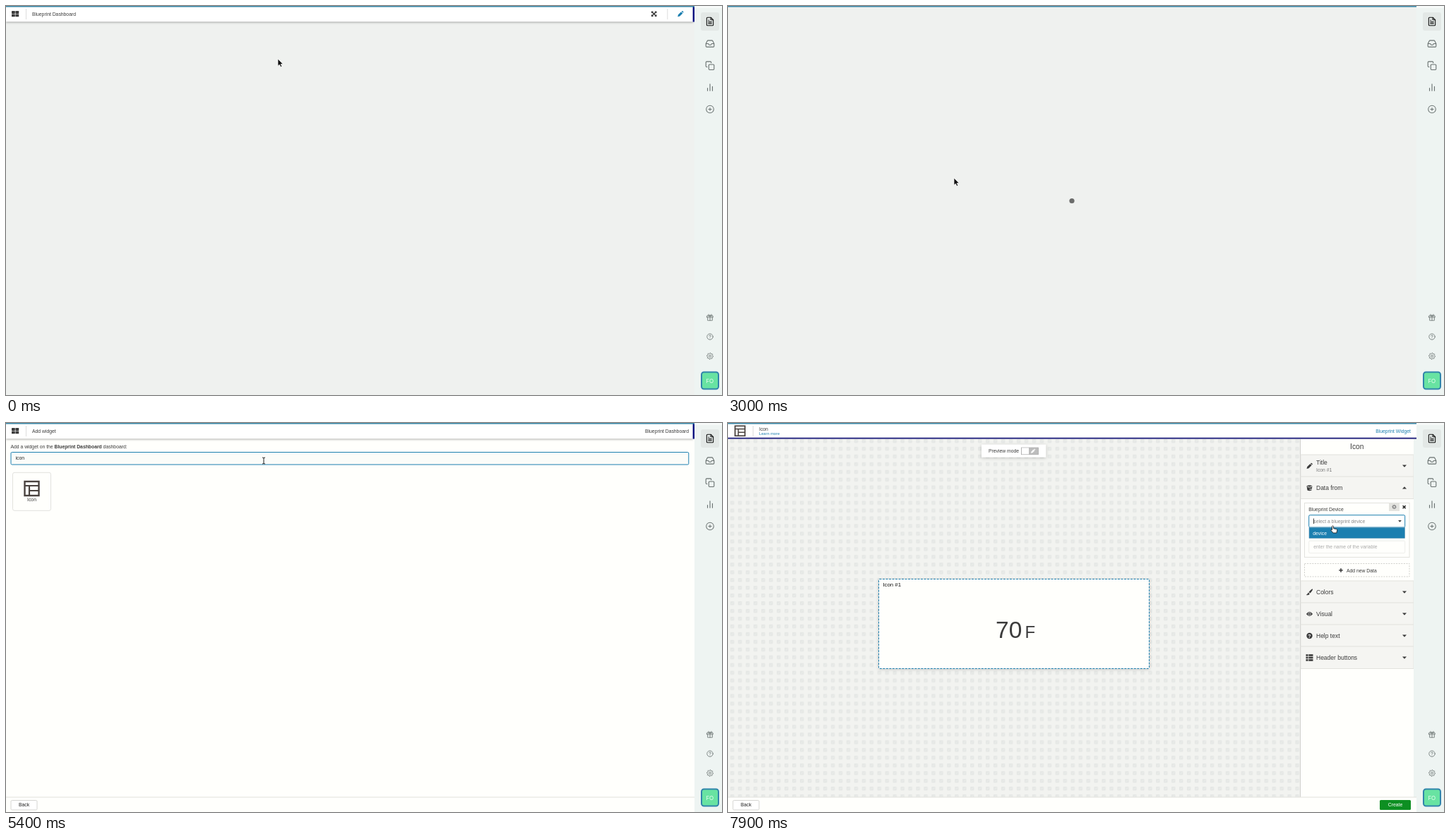
Animation of 1014 by 552 pixels, one loop 8000 ms. Source, as an HTML page:

```html
<!DOCTYPE html>
<html lang="en">
<head>
<meta charset="utf-8">
<title>Dashboard widget</title>
<style>
html, body { margin: 0; width: 100%; height: 100%; overflow: hidden; background: #eff1ef; }
svg { display: block; }
text { font-family: "Liberation Sans", Arial, sans-serif; white-space: pre; }
.bar { filter: drop-shadow(0 1px 1.5px #0005); }
.pill { filter: drop-shadow(0 1px 2px #0003); }
</style>
</head>
<body>
<svg width="1014" height="552" viewBox="0 0 1014 552">
  <defs>
    <pattern id="dots" x="3.3" y=".9" width="10.96" height="10.96" patternUnits="userSpaceOnUse">
      <rect width="5.5" height="5.5" rx="1" fill="#e5e7e5"/>
      <path d="M1.5 4 4 1.5" stroke="#eff1ef" stroke-width=".8"/>
    </pattern>
    <linearGradient id="edit"><stop offset=".5" stop-color="#fff"/><stop offset="1" stop-color="#d6d6d6"/></linearGradient>
    <linearGradient id="fade" x2="0" y2="1"><stop stop-color="#4a4340"/><stop offset=".5" stop-color="#1c7fb0"/><stop offset="1" stop-color="#1c7fb0" stop-opacity=".2"/></linearGradient>
  </defs>
  <g id="stage"></g>
</svg>
<script>
const LOOP = 8000, STEP = 100;
const BLUE = '#1c7fb0', DARK = '#4a4340', INK = '#3c3c3c', PAGE = '#fffffc', LINE = '#e2e2de';

// drawing helpers
const fill = (d, c = DARK) => `<path d="${d}" fill="${c}"/>`;
const stroke = (d, c = DARK, w = 2, more = '') => `<path d="${d}" fill="none" stroke="${c}" stroke-width="${w}" ${more}/>`;
const rect = (x, y, w, h, c, more = '') => `<rect x="${x}" y="${y}" width="${w}" height="${h}" fill="${c}" ${more}/>`;
const circle = (x, y, r, c, more = '') => `<circle cx="${x}" cy="${y}" r="${r}" fill="${c}" ${more}/>`;
const text = (x, y, s, size = 6.8, c = INK, more = '') => `<text x="${x}" y="${y}" font-size="${size}" fill="${c}" ${more}>${s}</text>`;
const at = (x, y, s, k = 1) => `<g transform="translate(${x} ${y}) scale(${k})">${s}</g>`;
const border = (c, w = 1) => `stroke="${c}" stroke-width="${w}"`;
const MID = 'text-anchor="middle"', END = 'text-anchor="end"', BOLD = 'font-weight="bold"';
const polar = (r, deg) => [r * Math.cos(deg * Math.PI / 180), r * Math.sin(deg * Math.PI / 180)].map(v => v.toFixed(2)).join(' ');
const arc = (r, a, b) => `M${polar(r, a)}A${r} ${r} 0 ${+(b - a > 180)} 1 ${polar(r, b)}`;
const ring = r => arc(r, 0, 180) + arc(r, 180, 360);
const wedge = (r, a, b) => arc(r, a, b) + 'L0 0Z';
const gear = r => 'M' + Array.from({length: 32}, (_, i) => polar(i % 4 < 2 ? r : r * .76, i * 11.25)).join('L') + 'Z';

// small glyphs
const plus = stroke('M-3.4 0H3.4M0-3.4V3.4', INK, 2);
const cog = (c = INK) => `<path fill-rule="evenodd" d="${gear(3.8)}${ring(1.4)}" fill="${c}"/>`;
const pencil = c => fill('M-4 4-3.2 1 .9-3.1 3.1-.9-1 3.2ZM1.5-3.6 2.4-4.2Q3-4.5 3.6-3.8L4.2-3Q4.5-2.5 3.6-1.5Z', c);
const eye = fill('M-4.6 0Q0-6 4.6 0Q0 6-4.6 0Z', INK) + circle(0, 0, 2.1, '#e0e0e0') + circle(0, 0, 1.3, INK);
const caretDown = fill('M-3-1.6H3L0 1.7Z', INK), caretUp = fill('M-3 1.6H3L0-1.7Z', INK);
const tiles = [8, 13.4].map(x => [7, 11.4].map(y => rect(x, y, 4.8, 3.9, INK, 'rx=".6"')).join('')).join('');

// widget icons, centred on 0,0
const eights = (y, h, c) => [-6.5, 1.2].map(x => stroke(`M${x} ${y}h5v${h}h-5zm0 ${h / 2}h5`, c, 1.4)).join('');
const axes = stroke('M-12-11V10H13', DARK, 1.8);
const arrow = (k = 1) => at(0, 0, stroke('M-9 6-2-1 2 2 8-5', BLUE, 3.4) + fill('M4-8H11V-1Z', BLUE), k);
const photo = rect(-12, -9.5, 24, 19, 'none', border(DARK, 2.2)) + circle(-6, -4.5, 2, DARK) + fill('M-9 7V4L-5 0-1 3 4-3 9 3V7Z', BLUE);
const table = c => rect(-11.5, -10, 23, 20, 'none', border(c, 2.2)) + rect(-12, -11, 24, 6, DARK);
const cells = c => stroke('M-11-1H11M-11 4.5H11M-4-5V10M4-5V10', c, 1.8);
const dial = circle(0, 0, 10, 'none', border(DARK, 2));
const bars = (list, f) => list.map((v, i) => f(v, i)).join('');
const HAND = 'M-1 6V1Q0-.6 1 1V4.2L5 5Q6.3 5.3 6.2 6.6L5.4 10.5H.6L-2.8 6.6Q-2.4 5.2-1 6Z';
const hand = `<path d="${HAND}" fill="#fff" stroke="#222" stroke-width=".9"/>`;
const layout = rect(-10, -10, 20, 20, 'none', border(DARK, 2.4)) + stroke('M-10-4H10M-3.5-4V10M-3.5 3H10', DARK, 2.2);
const cylinder = stroke('M-8-8V8Q0 13 8 8V-8', DARK, 2) + `<ellipse cy="-8" rx="8" ry="2.6" fill="${PAGE}" ${border(DARK, 2)}/>`;

const widgets = {
  'Map': stroke('M-12-8-4-10.5 4-8 12-10.5V8L4 10.5-4 8-12 10.5Z', DARK, 1.6) + stroke('M-4-10V8M4-8V10', BLUE, 1.3),
  'Display': rect(-10.5, -10, 21, 20, 'none', border(DARK, 2.2)) + eights(-5, 10, BLUE),
  'Card': eights(-10, 9, DARK) + fill('M-13 11V6Q-8 3-3 6T6 5L13 3V11Z', BLUE),
  'Tile': photo + at(0, 0, hand),
  'Keypad': rect(-11.5, -11, 23, 22, DARK) + bars([1, 1, 1, 0, 1, 1, 0, 0, 0], (v, i) =>
    rect(-9.8 + i % 3 * 7, -9 + (i / 3 | 0) * 6.7, 5.5, 5, v ? BLUE : PAGE)),
  'Dynamic Table': table('url(#fade)') + cells('url(#fade)') + stroke('M8 3V8', DARK, 3) + fill('M3.5 6.5H12.5L8 11.5Z'),
  'Static Table': table(DARK) + stroke('M-10-6H10', BLUE, 1) + cells(DARK),
  'Step Button': rect(-13, -7, 26, 14, BLUE, 'rx="4"') + text(0, 4.2, '5°', 12, '#fff', MID + BOLD) + stroke('M-11 0h4M8 0h4M10-2v4', '#fff', 1.3),
  'Push Button': stroke(arc(9, -55, 235), BLUE, 2.8) + stroke('M0-11V0', BLUE, 2.8),
  'Input Control': stroke('M-13-4H0', DARK, 1.3) + rect(-12.5, -.5, 25, 4.5, 'none', border(DARK, 1.4)) + rect(4, -3, 9, 8, BLUE) + stroke('M6 1 8 3 11-1', '#fff', 1.3),
  'Input Form': rect(-12, -9.5, 24, 19, 'none', border(DARK, 2)) + stroke('M-9-5H9M-9-1H9M-9 2.5H9', BLUE, 2, 'stroke-dasharray="2 1.2"') + stroke('M-9 6h2M-5 6H5M7 6h2', BLUE),
  'Line': axes + arrow(),
  'Area': axes + fill('M-10 8V0L-3-7 3-1 7-4 11 8Z', BLUE),
  'Horizontal Bar': stroke('M-8-11V11', DARK, 1.8) + bars([8, 13, 10, 16], (v, i) => rect(-6, -10 + i * 5.2, v, 4, BLUE)),
  'Vertical Column': axes + bars([7, 12, 9, 16], (v, i) => rect(-9 + i * 5.4, 8 - v, 3.8, v, BLUE)),
  'Multiple Axis': stroke('M-8-11V11', DARK, 1.8) + at(1, -5, arrow(.65)) + bars([8, 12, 15], (v, i) => rect(-6, 1 + i * 3.6, v, 2.5, BLUE)),
  'Dial': dial + text(0, 4, '1', 11, BLUE, MID + BOLD),
  'Angular': dial + circle(0, 0, 6, 'none', border(BLUE, 1.6)) + stroke('M-7-7 3 3', DARK, 1.5) + circle(1, 1, 2, DARK),
  'Solid': stroke(arc(9.5, 180, 360), BLUE, 7, 'transform="translate(0 6)"') + text(0, 7, '1', 8, DARK, MID + BOLD),
  'Clock': dial + stroke('M0-6V1H-5', BLUE, 2),
  'VU Meter': dial + stroke(arc(6.5, 200, 340), DARK, 2, 'stroke-dasharray="1.2 1.2"') + stroke('M-4-4 2 3', BLUE, 1.6),
  'Note': stroke('M-10-10H10V5L5 10H-10ZM10 5H5V10', DARK, 1.8) + stroke('M-7-6H7M-7-2.5H7M-7 1H5M-7 4.5H2', BLUE, 1.7),
  'Grain Bin': stroke('M-8-5V8L-2 11H8V-5L0-10ZM-8-5-2-3H8M-2-3V11', DARK, 1.8),
  'Image': photo,
  'Video': rect(-13, -10.5, 26, 21, DARK, 'rx="1"') + rect(-11, -6, 22, 12, PAGE) + stroke('M-11-8.2H11M-11 8.2H11', PAGE, 1.8, 'stroke-dasharray="2.4 1.8"') + fill('M-4-5 5 0-4 5Z', BLUE),
  'Pie': fill(wedge(11, 50, 270)) + at(.8, 0, fill(wedge(11, -90, 46), BLUE)),
  'Semi Pie': at(0, 6, fill(wedge(13, 226, 360)) + at(-1, 0, fill(wedge(12.5, 180, 222), BLUE))),
  'Semi Donut': at(0, 6, stroke(arc(10, 180, 245), DARK, 6) + stroke(arc(10, 250, 330), BLUE, 6) + stroke(arc(10, 334, 360), DARK, 6)),
  'Image Marker': at(0, 2, photo, .86) + fill('M0 0C-5-6-4-11 0-11S5-6 0 0Z', BLUE) + circle(0, -7, 1.5, PAGE),
  'Heat Map': axes + bars([...Array(16).keys()], (v, i) => circle(-7.5 + i % 4 * 5, -7.5 + (i >> 2) * 4.8, 2, BLUE)),
  'Compose': [6, 1, -4].map((y, i) => at(0, y, stroke('M-10 1-4-5 10-6 5 2-10 4Z', DARK, 1.8) + fill('M-10 2-4-5 10-6 5 2Z', i > 1 ? BLUE : PAGE))).join(''),
  'Icon': layout,
  'Cylinder': fill('M-8 0H8V8Q0 13-8 8Z', BLUE) + cylinder,
  'Custom': rect(-12.5, -10.5, 25, 21, 'none', border(DARK, 1.6)) + stroke('M-12-6H12M-10-8.3h2m2 0h2', DARK, 1.2) + rect(-2, -4, 14, 13, PAGE, border(BLUE, 1.6)) + stroke('M1 6 7 0', BLUE, 2.6) + circle(8, -1, 2, 'none', border(BLUE, 1.6))
};

// side navigation, outlines on a 24 unit grid
const nav = (y, d, k = .58, c = '#68706f') => at(997 - 12 * k, y - 12 * k, stroke(d, c, 1.9, 'stroke-linecap="round" stroke-linejoin="round"'), k);
const round = 'M22 12a10 10 0 1 1-20 0a10 10 0 1 1 20 0z';
const sidebar = rect(975, 0, 39, 552, '#eef4f2') + rect(975, 0, 39, 3, '#f7faf9') + rect(984, 9, 26, 26, '#e3e8e6', 'rx="3"') +
  nav(22, 'M14 2H6a2 2 0 0 0-2 2v16a2 2 0 0 0 2 2h12a2 2 0 0 0 2-2V8zM14 2v6h6M16 13H8M16 17H8M10 9H8', .58, '#111') +
  nav(53.5, 'M22 12h-6l-2 3h-4l-2-3H2M5.45 5.1 2 12v6a2 2 0 0 0 2 2h16a2 2 0 0 0 2-2v-6l-3.45-6.9A2 2 0 0 0 16.8 4H7.2a2 2 0 0 0-1.8 1.1z') +
  nav(84.7, 'M11 9h9a2 2 0 0 1 2 2v9a2 2 0 0 1-2 2h-9a2 2 0 0 1-2-2v-9a2 2 0 0 1 2-2zM5 15H4a2 2 0 0 1-2-2V4a2 2 0 0 1 2-2h9a2 2 0 0 1 2 2v1') +
  nav(115.5, 'M18 20V10M12 20V4M6 20v-6') +
  nav(146.5, round + 'M12 8v8M8 12h8', .53) +
  nav(442, 'M20 12v10H4V12M2 7h20v5H2zM12 22V7H7.5a2.5 2.5 0 0 1 0-5C11 2 12 7 12 7h4.5a2.5 2.5 0 0 0 0-5C13 2 12 7 12 7', .42) +
  nav(469.3, round + 'M9 9a3 3 0 0 1 5.9 1c0 2-3 3-3 3M12 17h.01', .42) +
  at(997, 496.8, stroke(gear(4.5) + ring(1.5), '#68706f', .8)) +
  rect(985, 519.5, 24, 24, '#68e3a2', 'rx="3.5" ' + border('#3085ab', 2)) +
  text(996.8, 534.5, 'FO', 8, '#effff5', MID + ' style="font-family:Inter,sans-serif"');

const topLine = rect(0, 0, 975, 1.5, '#3a87a8');
const header = (title, paint = '#fff') => rect(0, 1, 973, 21.3, paint, 'class="bar"') + tiles + rect(28, 4, 1, 15, '#ddd') +
  text(37, 14.1, title) + rect(972.6, 0, 2.4, 22.5, '#000f80');
const footer = rect(0, 531, 975, 21, PAGE) + rect(0, 530.5, 975, 1, LINE) +
  rect(7, 535.5, 37, 13.5, '#fff', 'rx="1.5" ' + border('#d5d5d2')) + text(25.5, 544.3, 'Back', 6.8, '#222', MID);

const expand = stroke('M-2.6-2.6 2.6 2.6M2.6-2.6-2.6 2.6', INK, 1.5) + [0, 90, 180, 270].map(a => `<path d="M-3.8-3.8H-.6L-3.8-.6Z" fill="${INK}" transform="rotate(${a})"/>`).join('');

const viewing = () => header('Blueprint Dashboard') + at(917.7, 11.2, expand) + rect(936.3, 4, 1, 15, '#ddd') + at(955.2, 11.3, pencil(BLUE));

const editing = t => rect(0, 22, 975, 530, 'url(#dots)') + header('Blueprint Dashboard', 'url(#edit)') +
  at(893.5, 11.2, plus) + at(919, 11.2, cog()) + rect(937.3, 4, 1, 15, '#c4c4c4') + at(957, 11.3, eye) +
  rect(6.5, 30, 154.5, 80.5, t >= 2300 ? '#f4f4f1' : PAGE, border('#8a8a8a', 1.4) + ' stroke-dasharray="1.6 1.6"') +
  at(62.8, 70, plus) + text(68.4, 73, 'Add widget', 8.6);

// a growing, fading dot
const loader = t => circle(487, 276.5, 12 * (t % 1000 / 1000), '#333', `opacity="${1 - t % 1000 / 1000}"`);

const typed = t => t < 4900 ? '' : t < 5000 ? 'i' : t < 5100 ? 'ic' : t < 5400 ? 'ico' : 'icon';
const PITCH = 60.25, CARD = 54;

function card(name, i, t) {
  const x = 9.5 + i % 15 * PITCH, y = 70.3 + Math.floor(i / 15) * PITCH;
  const [px, py] = pointer(t + STEP);
  const over = px > x && px < x + CARD && py > y && py < y + CARD;
  const pressed = over && t >= 6400;
  return rect(x, y, CARD, CARD, pressed ? '#e8e8e5' : over ? '#f4f4f1' : PAGE, 'rx="2.5" ' + border(pressed ? '#cfcfcb' : LINE)) +
    `<g opacity="${t < 3400 ? .3 : 1}">${at(x + 27, y + 22.7, widgets[name])}${text(x + 27, y + 41, name, 6.8, INK, MID)}</g>`;
}

function picker(t) {
  const word = typed(t), caret = t < 3800 || (t >= 4300 && t < 5000);
  const found = Object.keys(widgets).filter(n => n.toLowerCase().includes(word));
  return rect(0, 0, 975, 552, PAGE) + header('Add widget') + text(967, 14.1, 'Blueprint Dashboard', 6.8, INK, END) +
    text(6.5, 36.4, `Add a widget on the <tspan ${BOLD}>Blueprint Dashboard</tspan> dashboard:`) +
    rect(7, 41.5, 959.8, 17.5, '#fbfcf9', 'rx="1.5" ' + border(BLUE)) +
    text(13.5, 52.4, word || 'search', 6.8, word ? '#222' : '#999') +
    (caret ? rect(word ? 15 : 13.2, 46.5, .8, 7.5, '#111') : '') +
    found.map((n, i) => card(n, i, t)).join('') + footer;
}

const sections = [
  [45, 'Title', pencil(INK)],
  [76, 'Data from', fill('M-4-2.5Q0-5 4-2.5L3 3.5Q0 5-3 3.5Z', INK) + stroke('M-3-1.5Q0 0 4-2M0 2H5', '#f4f4f1', 1)],
  [224, 'Colors', fill('M4.5-4.5Q3-5-1 0L1 1.6Q5-3 4.5-4.5ZM-1.6.6.2 2.2Q0 5-4.8 4-2.8 3-1.6.6Z', INK)],
  [255, 'Visual', eye],
  [286, 'Help text', circle(0, 0, 4.2, INK) + text(0, 2.5, '?', 7, '#fff', MID + BOLD)],
  [317, 'Header buttons', [-3.5, 0, 3.5].map(y => rect(-5, y - 1.3, 3, 2.6, INK) + rect(-1.2, y - 1.3, 6.2, 2.6, INK)).join('')]
];

function editor(t) {
  const open = t >= 7600;
  const panel = rect(810, 23, 161, 508, PAGE) + rect(810, 23, 1, 508, '#cfcfcc') + text(890.7, 37.3, 'Icon', 10.2, INK, MID) +
    sections.map(([y, name, icon], i) => rect(811, y, 160, 31.5, '#f5f5f2', border(LINE)) + at(823.5, y + 16, icon) +
      text(833, y + (i ? 19 : 14), name, 8.5) + at(958, y + 16, i === 1 ? caretUp : caretDown)).join('') +
    text(833, 68.7, 'Icon #1', 6.8, '#777') +
    rect(816.5, 113.5, 148.5, 77, PAGE, border(LINE)) + rect(936, 113, 15, 12, '#e4e4e0') + at(943.5, 119, cog('#888'), .85) +
    stroke('M955.6 117.3l4 4m0-4l-4 4', '#222', 1.6) + text(822.3, 125.3, 'Blueprint Device') +
    rect(822.7, 130.7, 136, 17.3, '#fff', 'rx="1.5" ' + border(open ? BLUE : '#d5d5d2')) +
    text(829.3, 141.7, 'select a blueprint device', 6.8, '#888') + at(951.5, 139.3, caretDown, .8) +
    rect(822.7, 167.3, 136, 17.3, PAGE, 'rx="1.5" ' + border('#eeeeeb')) + text(829.3, 178, 'enter the name of the variable', 6.8, '#aaa') +
    (open ? rect(829, 135.5, .8, 7.5, '#111') + rect(823, 148.5, 135.5, 15, BLUE, border('#5c94b4', .6)) + text(828.3, 158.6, 'device', 6.8, '#fff') : '') +
    rect(816.5, 199.5, 148.5, 18.5, PAGE, border('#cfcfcb') + ' stroke-dasharray="2 1.6"') + at(868, 209, plus, .8) + text(876, 211.5, 'Add new Data');
  const preview = rect(359, 30.5, 91.3, 18.2, '#fff', 'class="pill"') + text(369, 42, 'Preview mode') +
    rect(415.5, 35, 24, 9.7, '#bdbdbd', border('#aaa', .8)) + rect(416, 35.3, 10, 9, '#fff') + at(432, 39.8, pencil('#fff'), .75) +
    rect(213.5, 221.5, 383, 127, PAGE, 'class="pill"') + rect(213.5, 221.5, 383, 127, 'none', 'rx="1" ' + border(BLUE) + ' stroke-dasharray="3 1.5"') +
    text(219.4, 232.2, 'Icon #1', 7.8, '#111') + text(379, 305.3, '70', 33.5) + text(420.6, 305.3, 'F', 24);
  return rect(0, 0, 975, 552, '#f2f3f0') + rect(0, 23, 810, 508, 'url(#dots)') + preview + panel +
    rect(971, 23, 4, 508, '#eef4f2') + footer + rect(923, 535, 44, 14, '#0d8f22', 'rx="1.5"') + text(945, 544.3, 'Create', 6.8, '#fff', MID) +
    rect(0, 1, 975, 20, '#fff') + rect(0, 20.7, 975, 1.9, '#23237f') + at(17, 11.2, layout, .7) + rect(35, 4, 1, 15, '#ddd') +
    text(44, 11, 'Icon') + text(44, 17, 'Learn more', 5.7, BLUE) + text(967, 14.1, 'Blueprint Widget', 6.8, BLUE, END);
}

// pointer path: time, x, y, shape
const cursors = {
  a: `<path d="M0 0V10.2L2.3 8.2 4 11.6 5.8 10.8 4.2 7.5H7.3Z" fill="#111" stroke="#fff" stroke-width=".7"/>`,
  h: hand,
  i: stroke('M-2-4.5Q0-4.5 0-3.5Q0-4.5 2-4.5M0-4V4M-2 4.5Q0 4.5 0 3.5Q0 4.5 2 4.5', '#222', 1)
};
const path = [
  [0, 385, 75, 'a'], [100, 385, 75, 'a'], [200, 520, 100, 'a'], [300, 700, 108, 'a'], [400, 838, 68, 'a'], [500, 838, 68, 'a'],
  [900, 945, 20, 'a'], [1000, 953, 12, 'h'], [1400, 957, 8, 'h'], [1600, 950, 15, 'a'], [1800, 738.5, 81, 'a'],
  [2000, 366, 124, 'a'], [2100, 366, 124, 'a'], [2300, 125, 75, 'h'], [2600, 125, 75, 'h'], [2700, 150, 110, 'a'],
  [3000, 320, 244, 'a'], [3300, 322, 255, 'a'], [3400, 350, 225, 'h'], [3500, 389, 139, 'h'], [3600, 378, 84, 'h'],
  [3700, 366, 57, 'i'], [4000, 365, 53.5, 'i'], [5700, 365, 53.5, 'i'], [5900, 240, 80, 'a'], [6100, 75, 95, 'h'],
  [6200, 50, 91.5, 'h'], [6600, 50, 91.5, 'h'], [6700, 120, 125, 'a'], [7000, 690, 293, 'a'], [7200, 825, 165, 'a'],
  [7400, 846, 138, 'h'], [7600, 846, 138, 'h'], [7700, 856, 140, 'h'], [7800, 856, 140, 'h'], [7900, 856.5, 145.5, 'h'], [8100, 856.5, 145.5, 'h']
];

function pointer(t) {
  const i = path.findIndex(p => p[0] > t), [t0, x0, y0, shape] = path[i - 1], [t1, x1, y1] = path[i];
  const k = (t - t0) / (t1 - t0);
  return [x0 + (x1 - x0) * k, y0 + (y1 - y0) * k, shape];
}

function scene(t) {
  if (t < 1500) return viewing();
  if (t < 2700) return editing(t);
  if (t < 3300) return loader(t - 2700);
  if (t < 6500) return picker(t);
  if (t < 6600) return loader(t - 6500);
  return editor(t);
}

const stage = document.getElementById('stage');
let shown = -1;
function tick() {
  const t = Math.floor(performance.now() % LOOP / STEP) * STEP;
  if (t !== shown) {
    const [x, y, shape] = pointer(t);
    stage.innerHTML = rect(0, 0, 975, 552, '#eff1ef') + scene(t) + topLine + sidebar + at(x, y, cursors[shape]);
    shown = t;
  }
  requestAnimationFrame(tick);
}
tick();
</script>
</body>
</html>
```
